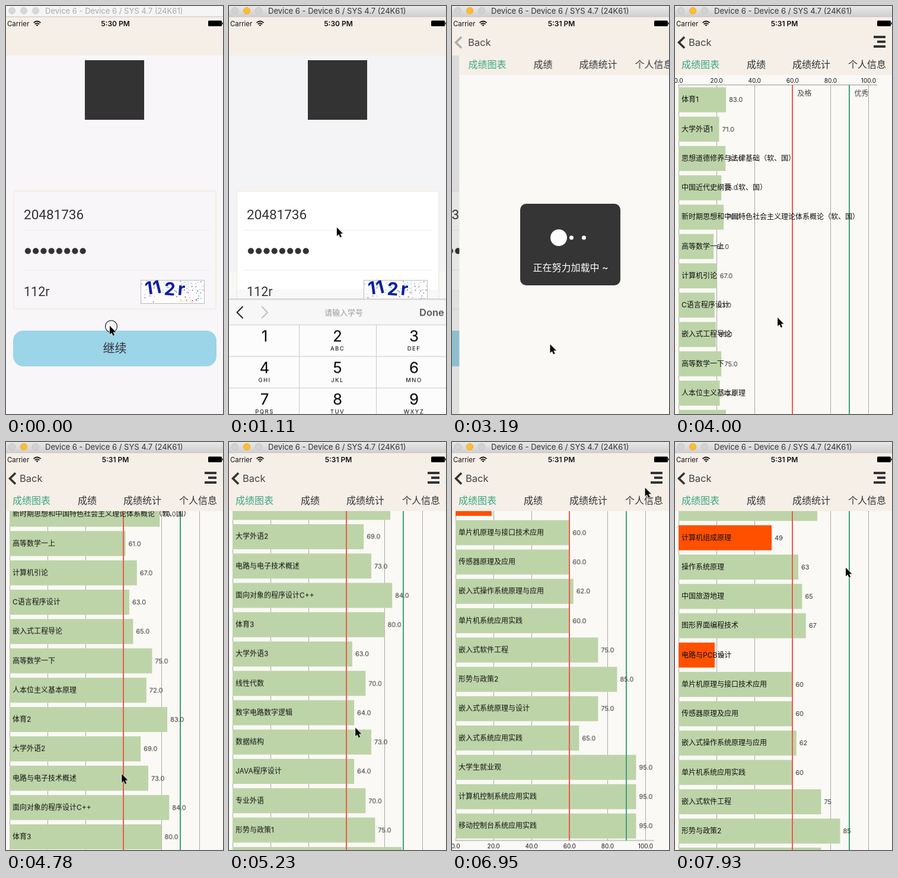
Write an HTML page that moves like this. It is 366 by 685 pixels and loops after 7.99 s.

```html
<!DOCTYPE html>
<html lang="zh-CN">
<head>
<meta charset="utf-8">
<title>成绩图表</title>
<style>
html, body { margin: 0; width: 100%; height: 100%; overflow: hidden; background: #f8f6f8; }
svg { display: block; width: 100%; height: 100%; }
text { font-family: Inter, "Noto Sans CJK SC", "Noto Sans CJK", sans-serif; fill: #333; white-space: pre; }
.field { font: 22.5px Roboto, sans-serif; }
.status { font-size: 11.4px; fill: #111; }
.clock { font-size: 12px; font-weight: 600; fill: #111; text-anchor: middle; }
.tab { font-size: 16px; font-weight: 500; }
.name { font-size: 12px; fill: #111; }
.value { font-size: 11px; }
.axis { font-size: 10px; fill: #111; text-anchor: middle; }
.mid { text-anchor: middle; }
.digit { font-size: 26px; fill: #000; text-anchor: middle; }
.letters { font-size: 9.5px; fill: #000; text-anchor: middle; letter-spacing: 1.5px; }
.dot, #mouth { animation: eat 614.6ms linear -498ms infinite; }
#mouth { animation-name: chew; }
@keyframes eat { to { transform: translateX(-21px); } }
@keyframes chew { 0%, 100% { transform: scaleY(0); } 50% { transform: scaleY(1); } }
</style>
</head>
<body>
<svg viewBox="0 0 366 685" preserveAspectRatio="none">
  <defs>
    <linearGradient id="metal" x2="0" y2="1">
      <stop stop-color="#e9e8e9"/><stop offset="1" stop-color="#d0cfd0"/>
    </linearGradient>
  </defs>

  <g id="login">
    <rect y="83" width="366" height="602" fill="#f8f6f8"/>
    <g id="lit">
      <rect y="83" width="366" height="363" fill="#f4f3f5"/>
      <rect y="446" width="366" height="239" fill="#f8f8f8"/>
      <rect x="13" y="311" width="341" height="165" fill="#fff"/>
    </g>
    <rect x="133" y="91" width="100" height="100" fill="#333"/>
    <rect x="13" y="311" width="341" height="198" rx="3" fill="none" stroke="#f5efe5" stroke-width="2.4"/>
    <path d="M24 376.5H343M24 443.5H343" stroke="#f2eeea"/>
    <text class="field" x="30" y="358">20481736</text>
    <g id="secret" fill="#333"></g>
    <text class="field" x="30" y="487" style="font-size:21.5px">112r</text>
    <g id="captcha"><rect x="227.5" y="460.5" width="107" height="39" fill="#fdfdff" stroke="#bbb"/></g>
    <rect x="12" y="545" width="343" height="60" rx="17" fill="#9cd4e8"/>
    <text class="mid" x="183.5" y="582" font-size="20">继续</text>
  </g>
  <rect id="dim" y="83" width="366" height="602"/>

  <g id="detail">
    <rect y="83" width="366" height="602" fill="#faf9f5"/>
    <g id="reveal"><g id="chart"></g></g>
    <rect y="83" width="366" height="33" fill="#f5efe8"/>
    <g id="tabs"></g>
  </g>

  <rect y="18" width="366" height="65" fill="#f5efe8"/>
  <text class="status" x="2" y="33.5">Carrier</text>
  <g fill="none" stroke="#111" stroke-width="1.7">
    <path d="M46.5 28.2Q52.5 22.8 58.5 28.2M48.7 30.5Q52.5 27.2 56.3 30.5"/>
    <path d="M50.5 31.8L52.5 34L54.5 31.8Q52.5 30.3 50.5 31.8Z" fill="#111" stroke="none"/>
  </g>
  <text class="clock" id="early" x="184.5" y="33.5">5:30 PM</text>
  <text class="clock" id="late" x="184.5" y="33.5">5:31 PM</text>
  <rect x="341" y="24.5" width="23" height="9.5" rx="1.5"/>
  <path d="M364.7 27.5H366V31H364.7Z"/>

  <g id="inactive">
    <rect width="366" height="18" fill="#f6f5f6"/>
    <g fill="#d8d7d8" stroke="#c9c8c9" stroke-width=".6"><circle cx="10" cy="8" r="5.7"/><circle cx="30" cy="8" r="5.7"/><circle cx="50" cy="8" r="5.7"/></g>
  </g>
  <g id="active">
    <rect width="366" height="18" fill="url(#metal)"/>
    <g fill="#d3d2d3" stroke="#bab9ba" stroke-width=".6"><circle cx="10" cy="8" r="5.7"/><circle cx="30" cy="8" r="5.7" fill="#fdbd2f" stroke="#dfa023"/><circle cx="50" cy="8" r="5.7"/></g>
  </g>
  <path d="M0 18H366" stroke="#c4c2c2"/>
  <text id="title" x="66" y="12.8" font-size="13">Device 6 - Device 6 / SYS 4.7 (24K61)</text>

  <path id="chevron" d="M16 52L6.5 61.2L16 70.5" fill="none" stroke="#333" stroke-width="3.6"/>
  <g id="back"><text x="23" y="67" font-size="16.5" style="fill:#444">Back</text></g>
  <path id="menu" d="M335 50H355V54H335ZM341 58H355V62H341ZM335 66H355V70H335Z" fill="#333"/>

  <g id="keyboard">
    <rect y="429.5" width="366" height="256" fill="#f7f7f7"/>
    <path d="M0 430H366" stroke="#b5b5b5"/>
    <path d="M23.5 442L13.5 452L23.5 462" fill="none" stroke="#111" stroke-width="1.8"/>
    <path d="M55 442L65 452L55 462" fill="none" stroke="#bbb" stroke-width="1.8"/>
    <text class="mid" x="193.5" y="457" font-size="13" style="fill:#999">请输入学号</text>
    <text x="321" y="458" font-size="16.5" font-weight="600" style="fill:#555">Done</text>
    <g id="keys"><rect y="473" width="366" height="212" fill="#fcfcfc"/></g>
  </g>

  <g id="hud">
    <rect x="115" y="332" width="169" height="137" rx="10" fill="#353535"/>
    <circle cx="180" cy="389" r="14" fill="#fff"/>
    <g transform="translate(180 389)"><path id="mouth" d="M0 0L15 -11V11Z" fill="#353535"/></g>
    <circle class="dot" cx="201.5" cy="389" r="3.5" fill="#fff"/>
    <circle class="dot" cx="222.5" cy="389" r="3.5" fill="#fff"/>
    <text class="mid" x="200" y="445" font-size="16" style="fill:#fff">正在努力加载中 ~</text>
  </g>

  <g id="cursor">
    <circle id="ring" cx="2.5" cy="1" r="10" fill="none" stroke="#111" stroke-width="1.1"/>
    <path d="M0 0V14.5L3.3 11.4L5.6 16.8L8.1 15.7L5.8 10.5H10.4Z" stroke="#fff" stroke-width="1.2" paint-order="stroke"/>
  </g>
</svg>
<script>
const LOOP = 7990, UNIT = 3.205, LEFT = 6, TOP = 132.5, ROW = 49.25;
const OUT = 'cubic-bezier(.33,1,.68,1)', SINE = 'cubic-bezier(.37,0,.63,1)';
const $ = id => document.getElementById(id);
const add = (id, markup) => $(id).insertAdjacentHTML('beforeend', markup);
const times = (n, make) => Array.from({ length: n }, (_, i) => make(i)).join('');

const courses = ('体育1 83,大学外语1 71,思想道德修养与法律基础（软、国） 82,中国近代史纲要（软、国） 75,' +
  '新时期思想和中国特色社会主义理论体系概论（软、国） 79,高等数学一上 61,计算机引论 67,C语言程序设计 63,' +
  '嵌入式工程导论 65,高等数学一下 75,人本位主义基本原理 72,体育2 83,大学外语2 69,电路与电子技术概述 73,' +
  '面向对象的程序设计C++ 84,体育3 80,大学外语3 63,线性代数 70,数字电路数字逻辑 64,数据结构 73,JAVA程序设计 64,' +
  '专业外语 70,形势与政策1 75,体育4 89,软件工程 73,计算机组成原理 49,操作系统原理 63,中国旅游地理 65,' +
  '图形界面编程技术 67,电路与PCB设计 19,单片机原理与接口技术应用 60,传感器原理及应用 60,' +
  '嵌入式操作系统原理与应用 62,单片机系统应用实践 60,嵌入式软件工程 75,形势与政策2 85,嵌入式系统原理与设计 75,' +
  '嵌入式系统应用实践 65,大学生就业观 95,计算机控制系统应用实践 95,移动控制台系统应用实践 95')
  .split(',').map(row => row.split(' '));
const BOTTOM = TOP + ROW * courses.length;
const SCROLL_END = BOTTOM - 669;
const scoreX = score => LEFT + score * UNIT;

function drawChart() {
  const axis = y => times(6, i => `<text class="axis" x="${scoreX(i * 20)}" y="${y}">${(i * 20).toFixed(1)}</text>`);
  const limit = (score, color, label) =>
    `<path d="M${Math.round(scoreX(score))} ${TOP}V${BOTTOM}" stroke="${color}" stroke-width="2"/>
     <text class="name" x="${scoreX(score) + 8}" y="151" style="fill:#444">${label}</text>`;
  const bars = courses.map(([, score], i) =>
    `<g transform="translate(${LEFT} ${TOP + ROW * i + 4})"><rect class="bar" width="${score * UNIT}" height="42" fill="${score < 60 ? '#ff5000' : '#bdd4a8'}"/></g>`);
  const labels = courses.map(([name, score], i) => {
    const y = TOP + ROW * (i + .5) + 4.2, x = scoreX(score) + 5;
    return `<text class="name" x="11" y="${y}">${name}</text>
      <g class="label" style="--grow:${-score * UNIT}px">
        <text class="value decimal" x="${x}" y="${y}">${score}.0</text>
        <text class="value whole" x="${x}" y="${y}">${score}</text></g>`;
  });
  add('chart', times(6, i => `<path d="M${Math.floor(scoreX(i * 20)) + .5} ${TOP}V${BOTTOM}" stroke="#aaa"/>`) +
    `<path d="M${LEFT} ${TOP}H341M${LEFT} ${BOTTOM}H341" stroke="#999"/>` + bars.join('') +
    limit(60, '#f0584c', '及格') + limit(90, '#3da27d', '优秀') + labels.join('') + axis(128.5) + axis(BOTTOM + 13));
}

function drawCaptcha() {
  let seed = 7;
  const rnd = n => (seed = seed * 16807 % 2147483647) / 2147483647 * n;
  add('captcha', times(95, () =>
    `<circle cx="${229 + rnd(104)}" cy="${462 + rnd(36)}" r="${.5 + rnd(.6)}" fill="hsl(${rnd(360)} 65% 60%)"/>`));
  [...'112r'].forEach((c, i) => add('captcha',
    `<text transform="translate(${[236, 251, 266, 289][i]} ${[485, 484, 485, 485][i]}) rotate(${[-8, -14, 4, 5][i]})" font-size="30" font-weight="700" style="fill:#0b1fa0">${c}</text>`));
}

function drawKeys() {
  const letters = ['', 'ABC', 'DEF', 'GHI', 'JKL', 'MNO', 'PQRS', 'TUV', 'WXYZ'];
  const columns = [60, 183, 312];
  add('keys', '<path d="M0 632H118V685H0ZM248 632H366V685H248Z" fill="#d2d5db"/>' +
    '<path d="M0 473H366M0 526H366M0 579H366M0 632H366M118.5 473V685M248.5 473V685" stroke="#c8c8c8"/>');
  const key = (d, col, row) => `<text class="digit" x="${columns[col]}" y="${501 + row * 53}">${d}</text>`;
  add('keys', letters.map((word, i) => key(i + 1, i % 3, i / 3 | 0) +
    `<text class="letters" x="${columns[i % 3]}" y="${516 + (i / 3 | 0) * 53}">${word}</text>`).join('') + key(0, 1, 3));
}

add('secret', times(8, i => `<circle cx="${36.9 + i * 13.25}" cy="411.3" r="5.1"/>`));
add('tabs', ['成绩图表', '成绩', '成绩统计', '个人信息'].map((name, i) =>
  `<text class="tab" x="${[11, 121, 198, 292][i]}" y="103.5"${i ? '' : ' style="fill:#3ba77f"'}>${name}</text>`).join(''));
drawChart();
drawCaptcha();
drawKeys();

// Each stop is [ms, value, easing to the next stop].
let css = '', count = 0;
function track(selector, prop, stops, ease = 'linear') {
  const all = [[0, stops[0][1]], ...stops, [LOOP, stops.at(-1)[1]]];
  const id = 'track' + count++;
  css += `@keyframes ${id}{` + all.map(([ms, value, e]) =>
    `${ms / LOOP * 100}%{${prop}:${value};${e ? 'animation-timing-function:' + e : ''}}`).join('') +
    `}${selector}{animation:${id} ${LOOP}ms ${ease} infinite}`;
}
const show = (selector, ...spans) =>
  track(selector, 'opacity', [[0, 0], ...spans.flatMap(([on, off]) => [[on, 1], [off, 0]])], 'step-end');
const moveX = (selector, from, to, ease = OUT) =>
  track(selector, 'transform', [[2850, `translateX(${from}px)`, ease], [3350, `translateX(${to}px)`]]);
const y = v => `translateY(${v}px)`;

show('#inactive', [0, 400]);
show('#active', [400, LOOP]);
track('#title', 'fill', [[0, '#aaa'], [400, '#333']], 'step-end');
show('#lit', [400, LOOP]);
show('#early', [0, 1300]);
show('#late', [1300, LOOP]);
track('#keyboard', 'transform', [[960, y(256), OUT], [1360, y(0)], [1862, y(0), OUT], [2262, y(256)]]);

moveX('#login', 0, -110);
moveX('#detail', 366, 0);
moveX('#tabs', 122, 0);
moveX('#back', 122, 0);
track('#dim', 'opacity', [[2850, 0, OUT], [3350, .1]]);
track('#chevron', 'opacity', [[2850, 0], [3190, .35], [3400, 1]]);
track('#back text', 'opacity', [[2850, 0], [3150, 1]]);
show('#hud', [2900, 3610]);
show('#menu', [3610, LOOP]);
show('#reveal', [3630, LOOP]);

track('.bar', 'transform', [[3630, 'scaleX(0)', SINE], [4630, 'scaleX(1)']]);
track('.label', 'transform', [[3630, 'translateX(var(--grow))', SINE], [4630, 'translateX(0px)']]);
show('.decimal', [0, 7440]);
show('.whole', [7440, LOOP]);
// Two separate flicks down, then a drag back up.
track('#chart', 'transform', [[4700, y(0), OUT], [5225, y(-589.5)], [5260, y(-589.5), SINE], [5800, y(-SCROLL_END)],
  [7470, y(-SCROLL_END), SINE], [7930, y(-1228)]]);

track('#cursor', 'transform', [[60, 175, 537], [560, 140, 352], [980, 140, 352], [1600, 338, 445], [1850, 338, 445],
  [2020, 244.5, 507], [2250, 165.5, 568], [3350, 165.5, 568], [4000, 173, 523], [4650, 190, 580], [5230, 213, 480],
  [5600, 270, 330], [5870, 291.5, 280], [6480, 344, 60], [6700, 344, 60], [7300, 300, 100], [7470, 298, 100],
  [7930, 288, 211]].map(([ms, px, py]) => [ms, `translate(${px}px,${py}px)`]));
show('#ring', [0, 90], [860, 960], [1760, 1860], [2740, 2850], [6500, 6600]);

document.head.appendChild(document.createElement('style')).textContent = css;
</script>
</body>
</html>
```
